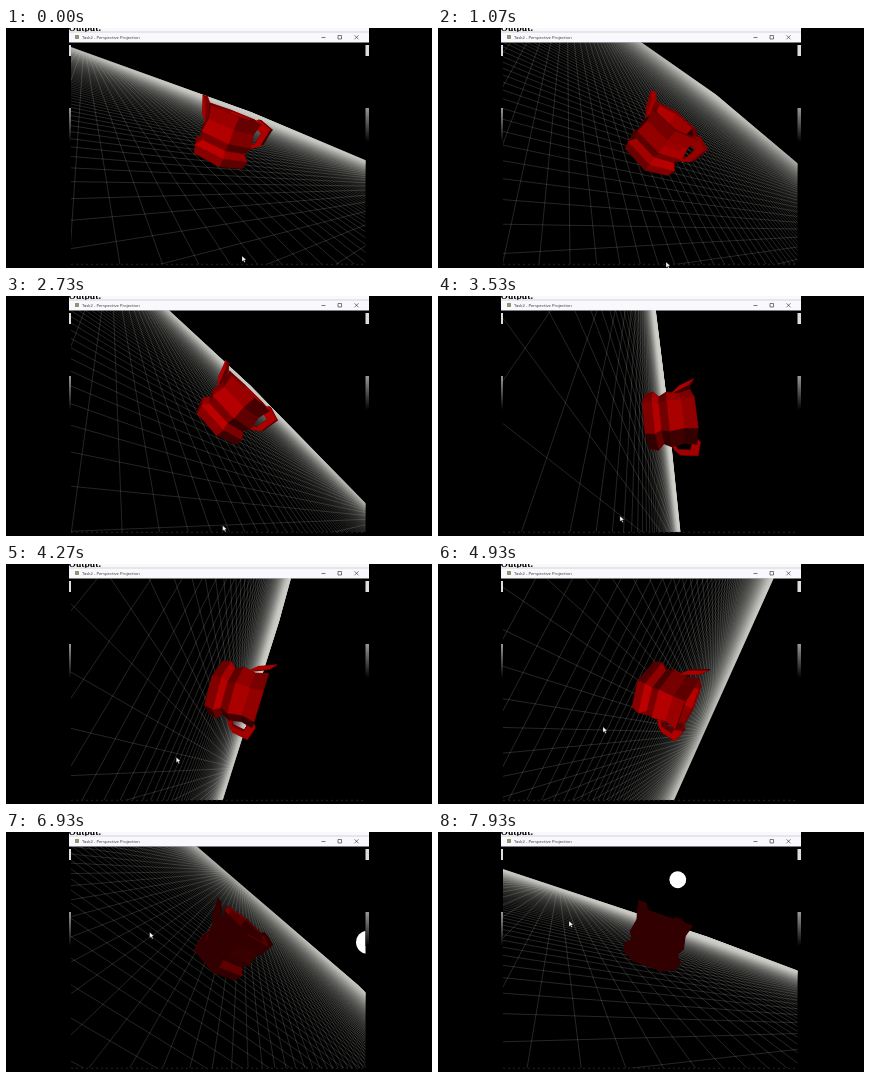
Recreate the animation shown at these times as an HTML page with a canvas. Size 426 px wide and 240 px high, loop 8000 ms.

```html
<!DOCTYPE html>
<html lang="en">
<head>
<meta charset="utf-8">
<title>Perspective Projection</title>
<style>
  html, body { margin: 0; width: 100%; height: 100%; overflow: hidden; background: #000; }
  canvas, svg { position: absolute; left: 0; top: 0; width: 426px; height: 240px; }
</style>
</head>
<body>
<canvas width="426" height="240"></canvas>
<svg viewBox="0 0 426 240">
  <defs>
    <linearGradient id="fade" x2="0" y2="1">
      <stop stop-color="#999"/><stop offset="1" stop-color="#000"/>
    </linearGradient>
    <clipPath id="strip"><rect x="63" width="300" height="4"/></clipPath>
  </defs>
  <rect x="63" width="300" height="14.5" fill="#f9f9fd"/>
  <text x="62.5" y="3" font-family="'Liberation Serif', serif" font-weight="bold" font-size="9.6" clip-path="url(#strip)">Output:</text>
  <path d="M63 4H363" stroke="#bbb" stroke-width=".6"/>
  <rect x="69" y="7" width="4" height="4" fill="#8a9a78"/>
  <text x="76" y="11" font-family="'Open Sans', sans-serif" font-size="4.2" fill="#333">Task2 - Perspective Projection</text>
  <path d="M315.5 9.5h4M332 7.5h3.5v3.5h-3.5zM348.5 7.3l4 4m0-4l-4 4" fill="none" stroke="#444" stroke-width=".7"/>
  <path d="M63 17h2v11h-2zM359.5 17h3.5v11h-3.5z" fill="#ddd"/>
  <path d="M63 80h2v34h-2zM359.5 80h3.5v34h-3.5z" fill="url(#fade)"/>
  <path d="M65 236.3H360" stroke="#333" stroke-width=".7" stroke-dasharray="2 3"/>
  <path id="cursor" d="M0 0v5.6l1.4-1.2 1 2.2 1-.5-1-2.1 1.8-.2z" fill="#fff" stroke="#000" stroke-width=".3"/>
</svg>
<script>
const LOOP = 8000, STEP = 1000 / 15;
const FOCAL = 190, DIST = 10, EXTENT = 72, CELL = 0.6, NEAR = 0.3;
const CENTER = [213, 125], RAD = Math.PI / 180;
const ctx = document.querySelector('canvas').getContext('2d');
const cursor = document.getElementById('cursor');

// Camera roll, pitch, yaw, light azimuth (degrees) and pointer position
const times = [0, 1070, 1930, 3530, 4930, 6000, 7930];
const tracks = {
  roll: [21.2, 37.3, 10.8, 83.5, 114, 65.6, 19.1],
  pitch: [16, 26.6, 27.5, 5.8, 21.8, 29.7, 12.2],
  yaw: [-40, -40, -43, -52, -86, -86, -120],
  light: [-10, 20, 0, -30, 20, 75, 180],
  mouseX: [236, 228, 248, 182, 165, 155, 131],
  mouseY: [228, 234, 232, 220, 163, 116, 89]
};

function sample(values, t) {
  const last = times.length - 1;
  if (t >= times[last]) return values[last];
  const i = times.findIndex((start, k) => t < times[k + 1]);
  const slope = k => {
    const a = Math.max(k - 1, 0), b = Math.min(k + 1, last);
    return (values[b] - values[a]) / (times[b] - times[a]);
  };
  const span = times[i + 1] - times[i], u = (t - times[i]) / span;
  const ease = u * u * (3 - 2 * u);
  return values[i] + (values[i + 1] - values[i]) * ease
    + span * u * (1 - u) * ((1 - u) * slope(i) - u * slope(i + 1));
}

const sub = (a, b) => a.map((v, i) => v - b[i]);
const dot = (a, b) => a[0] * b[0] + a[1] * b[1] + a[2] * b[2];
const cross = (a, b) => [a[1] * b[2] - a[2] * b[1], a[2] * b[0] - a[0] * b[2], a[0] * b[1] - a[1] * b[0]];
const unit = a => a.map(v => v / Math.hypot(...a));
const project = ([x, y, z]) => [FOCAL * x / z, -FOCAL * y / z];

function tilt([x, y, z], pitch) {
  const c = Math.cos(pitch), s = Math.sin(pitch);
  return [x, y * c + z * s, z * c - y * s + DIST];
}

function turn([x, y, z], yaw) {
  const c = Math.cos(yaw), s = Math.sin(yaw);
  return [x * c + z * s, y, z * c - x * s];
}

function buildPot() {
  const faces = [];
  const profile = [[1.45, -.2], [1.55, .25], [1.25, .55], [1.45, .95], [1.3, 1.6], [1.45, 2.2], [1.2, 2.15], [1.1, 1.2]];
  const ring = (p, k) => [p[0] * Math.cos(k * Math.PI / 3), p[1], p[0] * Math.sin(k * Math.PI / 3)];
  for (let j = 0; j < profile.length - 1; j++)
    for (let k = 0; k < 6; k++)
      faces.push([ring(profile[j], k), ring(profile[j], k + 1), ring(profile[j + 1], k + 1), ring(profile[j + 1], k)]);
  faces.push([0, 1, 2, 3, 4, 5].map(k => ring([1.1, 1.2], k)));
  const tube = (path, side, half) => {
    const corners = p => [[-half, -.15], [half, -.15], [half, .15], [-half, .15]]
      .map(([x, d]) => turn([x, p[1] + d, side * (p[0] + d)], -26 * RAD));
    for (let i = 0; i < path.length - 1; i++) {
      const a = corners(path[i]), b = corners(path[i + 1]);
      for (let k = 0; k < 4; k++) faces.push([a[k], a[(k + 1) % 4], b[(k + 1) % 4], b[k]]);
    }
    faces.push(corners(path[path.length - 1]));
  };
  tube([[1.1, .9], [1.75, 1.2], [1.85, 2], [1.2, 2.2]], -1, .22);
  tube([[1.1, 1], [1.5, 1.5], [1.8, 2.3]], 1, .22);
  return faces;
}
const pot = buildPot();

function drawGrid(view) {
  const line = (from, to) => {
    let a = view(from), b = view(to);
    if (a[2] < b[2]) [a, b] = [b, a];
    if (a[2] <= NEAR) return;
    if (b[2] < NEAR) {
      const u = (NEAR - a[2]) / (b[2] - a[2]);
      b = a.map((v, i) => v + (b[i] - v) * u);
    }
    ctx.beginPath();
    ctx.moveTo(...project(a));
    ctx.lineTo(...project(b));
    ctx.stroke();
  };
  ctx.lineWidth = .7;
  ctx.strokeStyle = 'rgba(205,205,200,.24)';
  for (let i = -EXTENT / CELL; i <= EXTENT / CELL; i++) {
    const p = i * CELL;
    line([p, 0, -EXTENT], [p, 0, EXTENT]);
    line([-EXTENT, 0, p], [EXTENT, 0, p]);
  }
}

function drawPot(view, light) {
  const faces = pot.map(face => {
    const points = face.map(view);
    const mid = [0, 1, 2].map(i => points.reduce((sum, p) => sum + p[i], 0) / points.length);
    let normal = unit(cross(sub(points[2], points[0]), sub(points[1], points[points.length - 1])));
    if (dot(normal, mid) > 0) normal = normal.map(v => -v);
    const lit = Math.max(0, dot(normal, unit(sub(light, mid))));
    return { points, depth: Math.hypot(...mid), red: Math.round(50 + 140 * lit) };
  });
  faces.sort((a, b) => b.depth - a.depth);
  for (const { points, red } of faces) {
    ctx.fillStyle = ctx.strokeStyle = `rgb(${red},0,0)`;
    ctx.lineWidth = .4;
    ctx.beginPath();
    points.forEach(p => ctx.lineTo(...project(p)));
    ctx.closePath();
    ctx.fill();
    ctx.stroke();
  }
}

function drawLight(light) {
  if (light[2] < 3) return;
  ctx.fillStyle = '#fff';
  ctx.beginPath();
  ctx.arc(...project(light), FOCAL * .74 / light[2], 0, 2 * Math.PI);
  ctx.fill();
}

function render(t) {
  const at = name => sample(tracks[name], t);
  const pitch = at('pitch') * RAD, yaw = at('yaw') * RAD, azimuth = at('light') * RAD;
  const view = p => tilt(turn(p, yaw), pitch);
  const light = tilt([8 * Math.sin(azimuth), 5.6, -8 * Math.cos(azimuth)], pitch);
  ctx.clearRect(0, 0, 426, 240);
  ctx.save();
  ctx.beginPath();
  ctx.rect(65, 14.5, 294.5, 221.5);
  ctx.clip();
  ctx.translate(...CENTER);
  ctx.rotate(at('roll') * RAD);
  drawGrid(view);
  drawLight(light);
  drawPot(view, light);
  ctx.restore();
  cursor.setAttribute('transform', `translate(${at('mouseX')} ${at('mouseY')})`);
}

const start = performance.now();
function tick() {
  const t = (performance.now() - start) % LOOP;
  render(Math.floor(t / STEP + .05) * STEP);
  requestAnimationFrame(tick);
}
tick();
</script>
</body>
</html>
```
